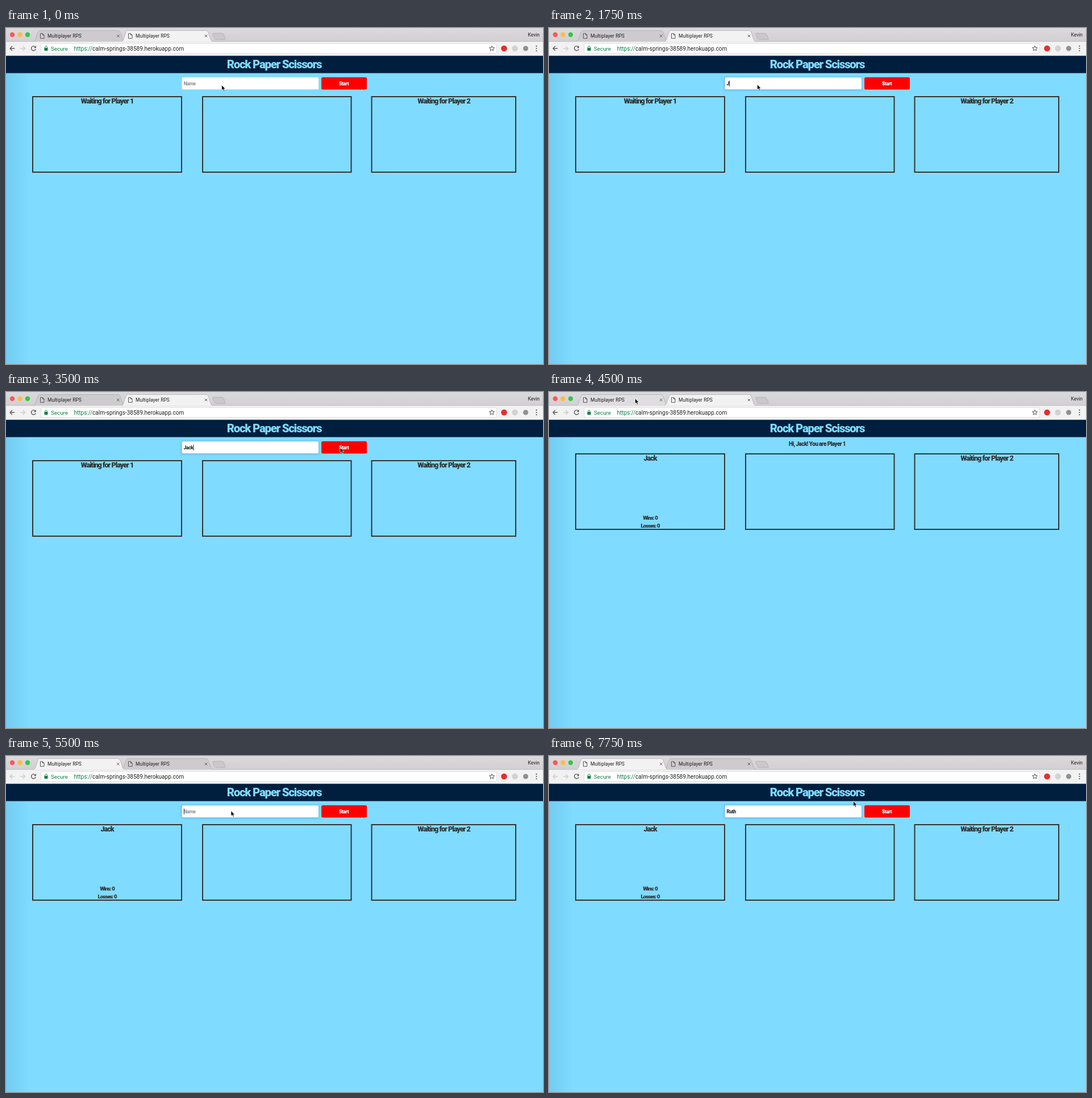
Write an HTML page that moves like this. It is 945 by 592 pixels and loops after 8 s.

```html
<!DOCTYPE html>
<html lang="en">
<head>
<meta charset="utf-8">
<title>Rock Paper Scissors</title>
<style>
html, body { margin: 0; width: 100%; height: 100%; overflow: hidden; background: #7fdbff; }
svg { display: block; width: 945px; height: 592px; }
.ui { font-family: Roboto, Inter, sans-serif; }
.game { font-family: Roboto, "Open Sans", sans-serif; font-weight: 900; letter-spacing: -.06em; fill: #2f2f2f; }
.mid { text-anchor: middle; }
.line { fill: none; stroke: #5a5a5a; stroke-width: 1.4; }
.thin { fill: none; stroke: #555; stroke-width: 1; }
</style>
</head>
<body>
<svg viewBox="0 0 945 592" xmlns="http://www.w3.org/2000/svg">
  <defs>
    <linearGradient id="bar" x2="0" y2="1">
      <stop stop-color="#dcd9dc"/><stop offset="1" stop-color="#d2cfd2"/>
    </linearGradient>
    <linearGradient id="edge">
      <stop stop-color="#004a78" stop-opacity=".1"/><stop offset="1" stop-color="#004a78" stop-opacity="0"/>
    </linearGradient>
    <filter id="blur" x="-10%" y="-50%" width="120%" height="200%"><feGaussianBlur stdDeviation="1.8"/></filter>
    <path id="tab" d="M0 24 C3 23 3.5 21 4.5 18 L8 8 C9 5.5 10 4.5 12 4.5 H149 C151 4.5 152 5.5 153 8 L156.500 18 C157.500 21 158 23 161 24"/>
    <g id="page-icon" class="thin"><path d="M.5 .5 H4.500 L7 3 V9 H.5 Z M4.500 .5 V3 H7"/></g>
    <path id="close" class="thin" d="M-2.200 -2.200 L2.200 2.200 M2.200 -2.200 L-2.200 2.200"/>
    <path id="arrow" class="line" d="M4.200 0 H-3.800 M0 -4 L-4 0 L0 4"/>
  </defs>

  <rect width="945" height="592" fill="#7fdbff"/>
  <rect y="79" width="42" height="513" fill="url(#edge)"/>

  <g class="game mid" id="boards">
    <g fill="none" stroke="#333" stroke-width="2">
      <rect x="47" y="121" width="262" height="133"/>
      <rect x="346" y="121" width="261.500" height="133"/>
      <rect x="643.500" y="121" width="253.500" height="133"/>
    </g>
    <text id="player1" x="178" y="132.500" font-size="12.500"></text>
    <text x="770.500" y="132.500" font-size="12.500">Waiting for Player 2</text>
    <g id="score" font-size="9.700">
      <text x="178" y="237">Wins: 0</text>
      <text x="178" y="250.500">Losses: 0</text>
    </g>
  </g>

  <text id="greeting" class="game mid" x="472" y="94.500" font-size="10"></text>

  <g id="form" class="game" font-size="8.700">
    <rect id="glow" x="308" y="86" width="243" height="24" rx="3" fill="#4a9ee8" filter="url(#blur)"/>
    <rect id="field" x="309.300" y="86.800" width="241" height="21.700" rx="2" fill="#fff" stroke-width=".8"/>
    <text id="typed" x="312.500" y="100.800"></text>
    <rect id="caret" y="92.500" width="1" height="10.500" fill="#333"/>
    <rect x="555" y="86.800" width="80" height="21.700" rx="2.500" fill="#f00"/>
    <text class="mid" x="594.500" y="100.800" style="fill:#fff">Start</text>
  </g>

  <rect y="49" width="945" height="30.500" fill="#001f3f"/>
  <text class="game mid" x="472" y="71" font-size="20.300" style="fill:#7fdbff">Rock Paper Scissors</text>

  <rect width="945" height="24" fill="url(#bar)"/>
  <rect y="24" width="945" height="25" fill="#f2f2f2"/>
  <path d="M0 23.800 H945" stroke="#b6b4b6" stroke-width=".7"/>
  <path d="M0 48.700 H945" stroke="#b5b5b5" stroke-width=".7"/>
  <circle cx="11" cy="11.800" r="4.200" fill="#fc5753"/>
  <circle cx="24.500" cy="11.800" r="4.200" fill="#fdbc40"/>
  <circle cx="38" cy="11.800" r="4.200" fill="#33c748"/>
  <path d="M363.500 10 Q364 9.300 366 9.300 H380 Q382 9.300 382.800 11 L386 18.500 Q386.500 20.300 384.500 20.300 H370 Q368 20.300 367 18.500 Z" fill="#cbc8cb" stroke="#aaa8aa" stroke-width=".7"/>

  <g id="tabs" class="ui" font-size="8.550">
    <g id="tab1" transform="translate(48)">
      <use href="#tab"/><use href="#page-icon" x="12" y="9.300"/>
      <text x="25" y="17.200">Multiplayer RPS</text><use href="#close" x="149.300" y="14"/>
    </g>
    <g id="tab2" transform="translate(203)">
      <use href="#tab"/><use href="#page-icon" x="12" y="9.300"/>
      <text x="25" y="17.200">Multiplayer RPS</text><use href="#close" x="149" y="14"/>
    </g>
  </g>
  <text class="ui" x="918.500" y="15.200" font-size="8.500" fill="#222">Kevin</text>

  <use id="back" href="#arrow" x="11" y="36"/>
  <use href="#arrow" transform="translate(29.500 36) scale(-1 1)" opacity=".25"/>
  <path class="line" d="M51.500 33.200 A4 4 0 1 0 52.300 37.300"/>
  <path d="M52.800 31.300 V35.300 H48.800 Z" fill="#5a5a5a"/>

  <rect id="address" x="62" y="27.300" width="801" height="17.500" rx="2" fill="#fff"/>
  <rect id="selection" x="119" y="30" width="196" height="12.500" fill="#acd2f9"/>
  <rect x="67.500" y="35" width="6" height="5" rx=".6" fill="#0b8043"/>
  <path d="M68.700 35 V33.800 A1.800 1.800 0 0 1 72.300 33.800 V35" fill="none" stroke="#0b8043"/>
  <g class="ui" font-size="10.050">
    <text x="79" y="39.700" fill="#0b8043" font-size="9.800">Secure</text>
    <text x="119.500" y="39.700" fill="#222"><tspan fill="#0b8043">https://</tspan>calm-springs-38589.herokuapp.com</text>
  </g>
  <path id="star" class="thin"/>
  <circle cx="876.500" cy="36" r="5.300" fill="#e62e2e"/>
  <circle cx="895.500" cy="36" r="5.200" fill="#d2d2d2"/>
  <circle cx="914.500" cy="36" r="4.500" fill="#909090"/>
  <path d="M933.500 31.900 v0 M933.500 36 v0 M933.500 40.100 v0" stroke="#555" stroke-width="2.200" stroke-linecap="round"/>

  <path id="cursor" d="M0 0 V9.300 L2.100 7.300 L3.600 10.800 L5.200 10.100 L3.700 6.800 H6.500 Z" fill="#000" stroke="#fff" stroke-width=".7"/>
</svg>
<script>
const LOOP = 8000, STEP = 250;
const FIRST = "Jack", SECOND = "Ruth";
const JOINED = 3750, SWITCHED = 4750, REFOCUSED = 5500;

// [time, value...]; each entry holds until the next one
const pointer = [
  [0, 379.5, 100.5], [250, 371, 100], [500, 366.5, 99.5], [3000, 470, 101],
  [3250, 573.5, 101], [3500, 588, 98], [4000, 520, 87], [4250, 300, 50],
  [4500, 151.5, 11.5], [4750, 253, 38], [5000, 268, 50], [5250, 370, 90],
  [5500, 396, 96.5], [7750, 535.5, 79.5]
];
const typing = [
  [0, ""], [1750, FIRST.slice(0, 1)], [2000, FIRST.slice(0, 3)], [2250, FIRST],
  [JOINED, ""], [6500, SECOND.slice(0, 1)], [6750, SECOND.slice(0, 2)],
  [7000, SECOND.slice(0, 3)], [7250, SECOND]
];
const blink = [
  [0, false], [500, true], [1000, false], [1500, true], [2750, false], [3250, true],
  [JOINED, false], [REFOCUSED, true], [6000, false], [6500, true], [7750, false]
];

const el = id => document.getElementById(id);
const set = (id, attrs) => Object.entries(attrs).forEach(([k, v]) => el(id).setAttribute(k, v));
const show = (id, on) => set(id, { visibility: on ? "visible" : "hidden" });
const at = (keys, t) => keys.filter(k => k[0] <= t).pop().slice(1);

const starPoints = Array.from({ length: 10 }, (_, i) => {
  const r = i % 2 ? 2.1 : 4.8, a = (i / 5 - 0.5) * Math.PI;
  return `${855 + r * Math.cos(a)} ${36.2 + r * Math.sin(a)}`;
});
set("star", { d: `M${starPoints.join("L")}Z` });

function styleTab(id, active, hover) {
  set(id, {
    fill: "#222", stroke: "none"
  });
  const shape = el(id).firstElementChild;
  shape.setAttribute("fill", active ? "#f2f2f2" : hover ? "#dfdddf" : "#cecbce");
  shape.setAttribute("stroke", "#a9a7a9");
  shape.setAttribute("stroke-width", ".7");
}

let lastStep = -1;
function draw(now) {
  const step = Math.floor((now % LOOP) / STEP);
  if (step !== lastStep) {
    lastStep = step;
    render(step * STEP);
  }
  requestAnimationFrame(draw);
}

function render(t) {
  const joined = t >= JOINED, switched = t >= SWITCHED;
  const greeted = joined && !switched;
  const selected = switched && t < REFOCUSED;
  const focused = (t >= 500 && !joined) || t >= REFOCUSED;
  const [x, y] = at(pointer, t), [text] = at(typing, t), [caretOn] = at(blink, t);

  set("cursor", { transform: `translate(${x} ${y})` });

  set("form", { display: greeted ? "none" : "inline" });
  show("glow", focused);
  set("glow", { opacity: 0.55 });
  set("field", { stroke: focused ? "#8fbfea" : "#d0d0d0" });
  const typed = el("typed");
  typed.textContent = text || "Name";
  typed.style.fill = text ? "#333" : "#999";
  show("caret", caretOn);
  set("caret", { x: text && !greeted ? 312.8 + typed.getComputedTextLength() : 312.8 });

  el("greeting").textContent = greeted ? `Hi, ${FIRST}! You are Player 1` : "";
  el("player1").textContent = joined ? FIRST : "Waiting for Player 1";
  show("score", joined);
  set("boards", { transform: `translate(0 ${greeted ? -12 : 0})` });

  styleTab("tab1", switched, t === 4500);
  styleTab("tab2", !switched, false);
  el("tabs").append(el(switched ? "tab1" : "tab2"));
  set("back", { opacity: switched ? 0.25 : 1 });
  show("selection", selected);
  set("address", { stroke: selected ? "#5a9de0" : "#d4d4d4", "stroke-width": selected ? 1.3 : 0.7 });
}

requestAnimationFrame(draw);
</script>
</body>
</html>
```
